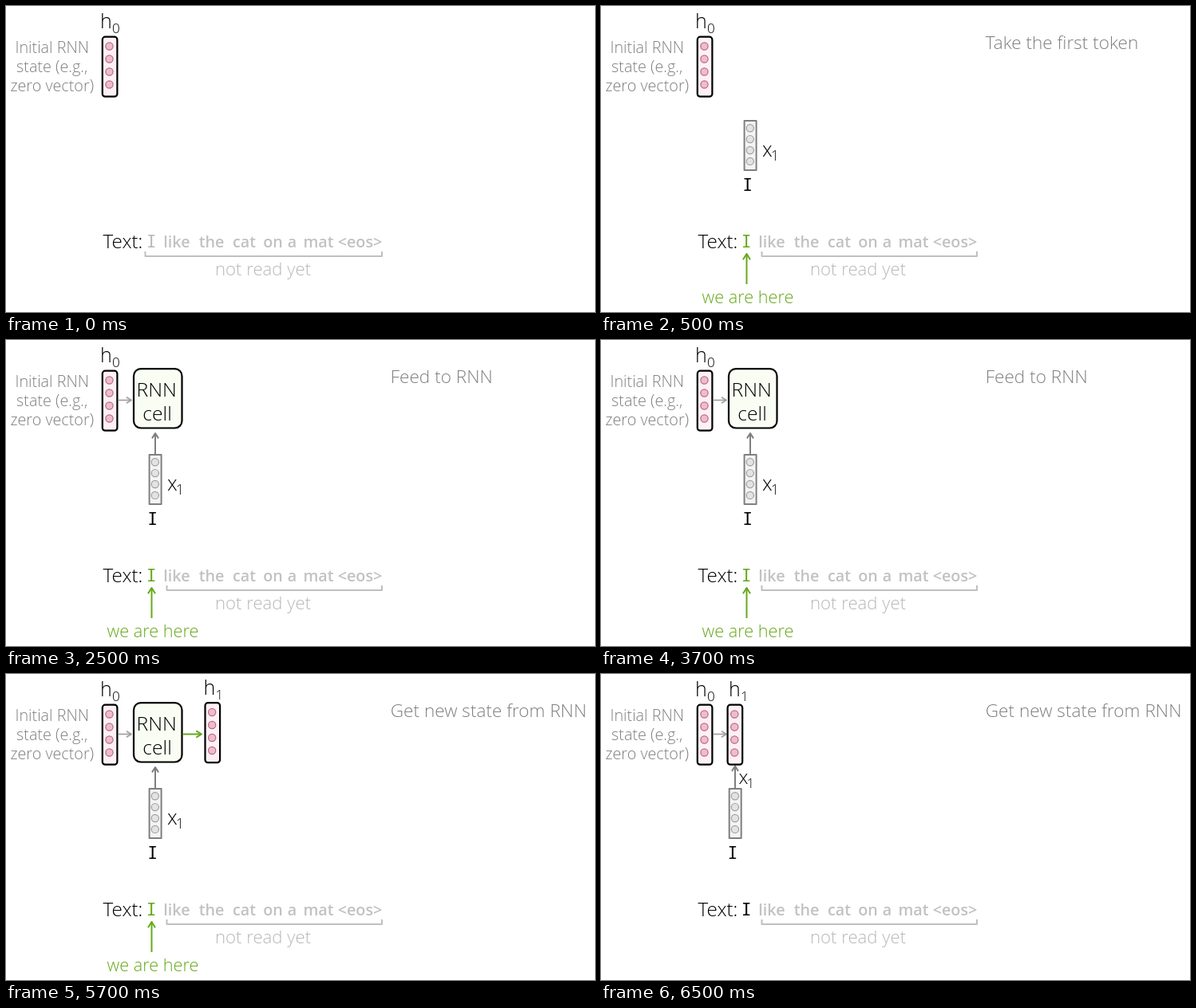
Animation, 738 px wide and 384 px high, one loop 8000 ms. Source, as an HTML page with a canvas:

```html
<!DOCTYPE html>
<html lang="en">
<head>
<meta charset="utf-8">
<title>RNN reading a text</title>
<style>
  html, body { margin: 0; width: 100%; height: 100%; overflow: hidden; background: #fff; }
  canvas { display: block; width: 738px; height: 384px; }
</style>
</head>
<body>
<canvas id="stage"></canvas>
<script>
const W = 738, H = 384, LOOP = 8000;
const STARTS = [0, 500, 2500, 4500, 6500];
const CAPTIONS = ['', 'Take the first token', 'Feed to RNN', 'Get new state from RNN', 'Get new state from RNN'];
const BLACK = '#000', GREEN = '#66a81a', GREY = '#7f7f7f', PALE = '#b8b8b8', NOTE = '#7f7f7f';
const LIGHT = '"Open Sans", "Noto Sans", sans-serif';
const WORDS = [['like', 214], ['the', 257.5], ['cat', 298.5], ['on', 334.5], ['a', 358.5], ['mat', 391.5], ['<eos>', 443.5]];

const canvas = document.getElementById('stage');
const ctx = canvas.getContext('2d');
const ratio = window.devicePixelRatio || 1;
canvas.width = W * ratio;
canvas.height = H * ratio;
ctx.scale(ratio, ratio);
ctx.lineJoin = 'round';

function text(str, x, y, size, color, align = 'left', weight = 300, family = LIGHT) {
  ctx.font = `${weight} ${size}px ${family}`;
  ctx.textAlign = align;
  ctx.fillStyle = color;
  ctx.fillText(str, x, y);
}

function stroke(points, color, width) {
  ctx.beginPath();
  points.forEach(([x, y]) => ctx.lineTo(x, y));
  ctx.strokeStyle = color;
  ctx.lineWidth = width;
  ctx.stroke();
}

function arrow(x1, y1, x2, y2, color, width, head) {
  const len = Math.hypot(x2 - x1, y2 - y1);
  const ux = (x2 - x1) / len, uy = (y2 - y1) / len;
  const bx = x2 - ux * head * 1.6, by = y2 - uy * head * 1.6;
  stroke([[x1, y1], [x2, y2]], color, width);
  stroke([[bx - uy * head, by + ux * head], [x2, y2], [bx + uy * head, by - ux * head]], color, width);
}

function box(x, y, w, h, r, fill, line, width) {
  ctx.beginPath();
  ctx.roundRect(x, y, w, h, r);
  ctx.fillStyle = fill;
  ctx.fill();
  ctx.strokeStyle = line;
  ctx.lineWidth = width;
  ctx.stroke();
}

function dots(x, y, step, fill, line) {
  for (let i = 0; i < 4; i++) {
    ctx.beginPath();
    ctx.arc(x, y + i * step, 4.6, 0, Math.PI * 2);
    ctx.fillStyle = fill;
    ctx.fill();
    ctx.strokeStyle = line;
    ctx.lineWidth = 1.2;
    ctx.stroke();
  }
}

function label(letter, index, x, y, size, dx, dy) {
  text(letter, x, y, size, BLACK);
  text(index, x + dx, y + dy, size * 0.68, BLACK);
}

function state(index, x, y, labelX) {
  label('h', index, labelX, y - 10, 25, 15, 6);
  box(x - 9.2, y + 0.7, 18.6, 75, 3.5, '#fdf1f4', BLACK, 2.2);
  dots(x - 0.5, y + 12.5, 16, '#f0bccb', '#b5698a');
}

function input(x, labelX, labelY, size) {
  box(x - 7.5, 144, 15, 62, 0, '#f4f4f4', GREY, 2);
  dots(x - 0.3, 153.2, 13.9, '#e3e3e3', '#a0a0a0');
  label('x', '1', labelX, labelY, size, size * 0.43, 5);
  serifI(x - 3.3, 232, BLACK);
}

function serifI(x, y, color) {
  text('I', x, y, 22.3, color, 'center', 500, '"Noto Sans Mono", "DejaVu Sans Mono", monospace');
}

function sentence(scene) {
  const reading = scene > 0 && scene < 4;
  text('Text:', 121.5, 303.5, 24.3, BLACK);
  serifI(182.3, 303, scene === 0 ? PALE : reading ? GREEN : BLACK);
  for (const [word, x] of WORDS) text(word, x, 303, 19.8, '#c2c2c2', 'center', 600);
  const left = scene === 0 ? 174.5 : 201.5;
  stroke([[left, 308], [left, 314], [471, 314], [471, 308]], '#bfbfbf', 2);
  text('not read yet', 322, 338, 22.2, PALE, 'center');
  if (reading) {
    arrow(182.5, 349, 182.5, 311, GREEN, 2, 4.5);
    text('we are here', 184, 373, 21.7, GREEN, 'center');
  }
}

function draw(scene) {
  ctx.fillStyle = '#fff';
  ctx.fillRect(0, 0, W, H);

  ['Initial RNN', 'state (e.g.,', 'zero vector)'].forEach((line, i) =>
    text(line, 57.7, 59 + i * 24.2, 19.8, NOTE, 'center'));
  text(CAPTIONS[scene], 481.7, 54, 22.6, NOTE);
  state('0', 130, 38, 118);
  sentence(scene);

  if (scene >= 2) arrow(141, 75.5, 157, 75.5, '#a0a0a0', 1.7, 3.8);
  if (scene === 2 || scene === 3) {
    arrow(187, 143, 187, 117, GREY, 2, 4);
    box(160, 36.2, 60.5, 74.3, 9, '#f9fdf3', BLACK, 2.2);
    text('RNN', 188.7, 70.5, 24.7, BLACK, 'center');
    text('cell', 189.5, 100.5, 24.7, BLACK, 'center');
  }
  if (scene === 3) {
    arrow(221.5, 75.5, 245, 75.5, GREEN, 2, 4.2);
    state('1', 258.7, 35.5, 247.5);
  }
  if (scene === 4) {
    arrow(168, 143, 168, 115.5, GREY, 2, 4);
    state('1', 167.8, 38, 160);
    input(168.2, 172.5, 138, 24);
  } else if (scene > 0) {
    input(187.1, 202, 188.5, 25.5);
  }
}

const start = performance.now();
function tick() {
  const t = (performance.now() - start) % LOOP;
  draw(STARTS.filter(s => s <= t).length - 1);
  requestAnimationFrame(tick);
}
tick();
</script>
</body>
</html>
```
